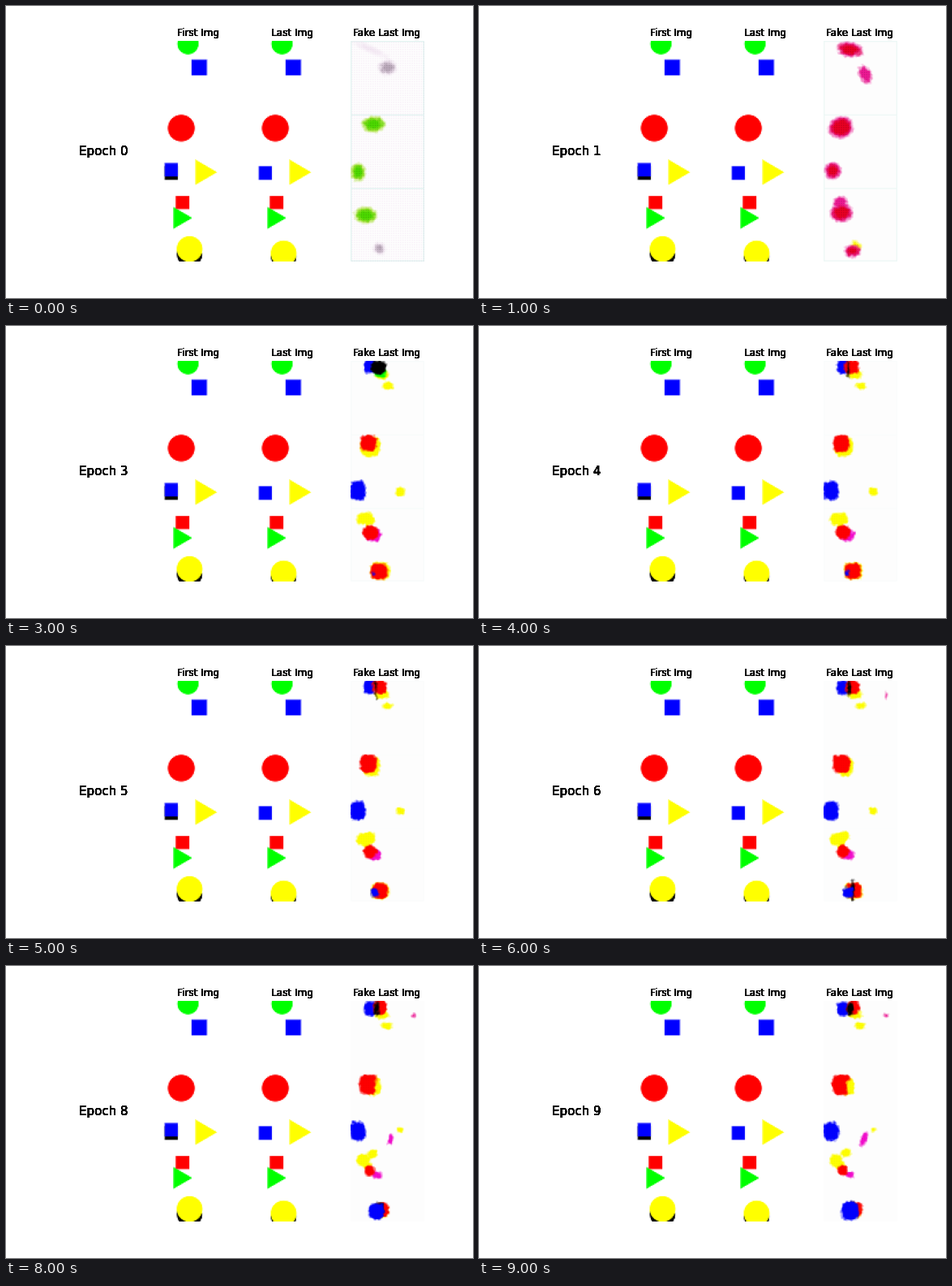
Recreate the animation shown at these times as a matplotlib script. Size 576 by 360 pixels, loop 10 s.

```python
import numpy as np
import matplotlib.pyplot as plt
from matplotlib.animation import FuncAnimation

W, H, DPI = 576, 360, 72
EPOCHS = 10
N = 64                       # cells per panel side
TOP, HEIGHT = 43.2, 271.8
CELL = HEIGHT / (3 * N)
CENTERS = (237.0, 353.4, 469.9)
STEP = CENTERS[1] - CENTERS[0]

RED, GREEN, BLUE = (1, 0, 0), (0, 1, 0), (0, 0, 1)
YELLOW, BLACK, MAGENTA = (1, 1, 0), (0, 0, 0), (0.95, 0.05, 0.8)
CRIMSON, PINK, LIME = (0.91, 0, 0.14), (0.93, 0.1, 0.58), (0.3, 0.86, 0)
OLIVE, MAUVE, HAZE = (0.68, 0.9, 0.2), (0.74, 0.67, 0.74), (0.95, 0.9, 0.95)

rows, cols = np.mgrid[0:3 * N, 0:N]
Y = TOP + (rows + 0.5) * CELL
X_LEFT = CENTERS[0] + (cols + 1 - N / 2) * CELL
X_FAKE = CENTERS[2] + (cols + 0.5 - N / 2) * CELL
MESH = (rows % 2) * (cols % 2)


def paint(img, dist, color, soft=1.0, mesh=0.0):
    """Blend a colour in where the signed distance (px) is negative."""
    a = np.clip(0.5 - dist / soft, 0, 1)[..., None]
    tone = np.array(color) * (1 - mesh * MESH[..., None])
    img[:] = img * (1 - a) + tone * a


def disc(img, x, y, r, color):
    paint(img, np.hypot(X_LEFT - x, Y - y) - r, color)


def square(img, x, y, half, color):
    paint(img, np.maximum(abs(X_LEFT - x), abs(Y - y)) - half, color)


def triangle(img, x, y, w, half, color):
    slope = (abs(Y - y) * w + (X_LEFT - x - w) * half) / np.hypot(w, half)
    paint(img, np.maximum(x - X_LEFT, slope), color)


def scene(last):
    img = np.ones((3 * N, N, 3))
    disc(img, 224.7, 46.8, 13, GREEN)
    square(img, 238.5, 76, 9.6, BLUE)
    disc(img, 216.5, 150.7, 16.5, RED)
    triangle(img, 234, 205, 26.5, 15.5, YELLOW)
    square(img, 204.3, 206, 8.2, BLUE if last else BLACK)
    if not last:
        square(img, 204.3, 202, 8.2, BLUE)
    square(img, 218, 242.3, 8.2, RED)
    triangle(img, 207, 261.3, 23, 13.3, GREEN)
    disc(img, 226.7, 309 if last else 306, 15.6, BLACK)
    disc(img, 226.7, 305 if last else 299.6, 15.8, YELLOW)
    return img


class Fake:
    """Column of three generated panels at one epoch."""

    def __init__(self, epoch):
        self.img = np.full((3 * N, N, 3), 0.995)
        noise = np.random.default_rng(epoch).normal(0, 1.4, (3 * N, N))
        for axis in (0, 1, 0, 1):
            noise = (noise + np.roll(noise, 1, axis)) / 2
        self.noise = noise

    def blob(self, color, x, y, rx, ry, soft=2.5, tilt=0, power=2.5, mesh=0.03):
        if min(rx, ry) < 0.9:
            return
        t = np.radians(tilt)
        dx, dy = X_FAKE - x, Y - y
        u = abs(dx * np.cos(t) + dy * np.sin(t)) / rx
        v = abs(dy * np.cos(t) - dx * np.sin(t)) / ry
        dist = ((u ** power + v ** power) ** (1 / power) - 1) * min(rx, ry)
        panel = int((y - TOP) / (N * CELL))
        dist = np.where(rows // N == panel, dist + self.noise, 99)
        paint(self.img, dist, color, soft, mesh)

    def glow(self, halo, core, x, y, rx, ry, tilt=0):
        self.blob(halo, x, y, rx, ry, 4.5, tilt, 2, 0.1)
        self.blob(core, x, y, rx - 3, ry - 3, 4.5, tilt, 2, 0.15)

    def rims(self, strength):
        """Tinted panel borders."""
        edge = (rows % N == 0) | (cols == 0) | (rows == 3 * N - 1) | (cols == N - 1)
        self.img -= strength * edge[..., None] * np.array([1, 0.35, 0.45])


def draw_green(f):
    f.img -= 0.055 * MESH[..., None] * np.array([0.4, 1, 0.4])
    f.blob(HAZE, 448, 53, 14, 3, 6, 25)
    f.glow(HAZE, MAUVE, 470, 76, 11, 9)
    f.glow(OLIVE, LIME, 453, 146, 13, 9.5, -8)
    f.glow(OLIVE, LIME, 434, 205, 8.5, 10)
    f.glow(OLIVE, LIME, 443, 258, 12.5, 9.5)
    f.glow(HAZE, MAUVE, 460, 299, 7, 7)


def draw_pink(f):
    f.glow(PINK, CRIMSON, 457, 54, 14.5, 8.5, 12)
    f.glow(PINK, PINK, 475.5, 84.5, 7, 10, -30)
    f.glow(PINK, CRIMSON, 446, 150, 14.5, 12.5, -20)
    f.glow(PINK, CRIMSON, 436, 203, 9.5, 9.5)
    f.glow(PINK, PINK, 445, 243, 8, 8)
    f.glow(PINK, CRIMSON, 446.5, 255, 12.5, 11)
    f.glow(YELLOW, YELLOW, 464, 296, 6, 5.5)
    f.glow(PINK, CRIMSON, 460, 302, 9, 7.5)


def draw_shapes(f, epoch):
    p = (epoch - 2) / (EPOCHS - 3)     # slow drift, 0 to 1
    fade = np.exp(-2 * (epoch - 2))    # quick early shrink
    late = max(0, 2 * p - 1)           # details of the second half
    soft = 2.5 + 2 * fade
    dark = epoch == 3

    def go(a, b):
        return a + (b - a) * p

    # upper panel
    f.blob(YELLOW, 463, 60, 8, 5 + 4 * fade, soft)
    f.blob(YELLOW, go(470.5, 469), 74, 6 + 4 * fade, 4 + 6 * fade, soft)
    f.blob(GREEN if dark else YELLOW, 461, 57, 7.5, 6)
    f.blob(BLUE, 448.5, go(49, 53), 7.5, 9, power=3)
    f.blob(BLACK if dark else RED, go(458.5, 461), 51, go(9.5, 8), 8.5)
    f.blob(BLACK, go(454, 457.5), 52.5, 4 * p, 7.5, mesh=0)
    f.blob(PINK, 502, 61, 2.5 * late ** 0.5, 2, 3)

    # middle panel
    f.blob(YELLOW, go(448, 453), 148.5, go(12.5, 9) + 4 * fade, go(13, 11) + fade, soft)
    f.blob(RED, 446.5, go(144, 146.5), go(9.5, 11.5), go(9.5, 13), soft, power=3)
    f.blob(YELLOW, 457, 149, 4.5 * p ** 4, 8)
    f.blob(BLUE, 433.5, go(203, 204), 9.5, 11.5 + 2.5 * fade, power=3)
    f.blob(YELLOW, 485.5, go(205, 202), go(6, 3) + fade, go(6, 2.5), soft)
    f.blob(MAGENTA, 474, 213.5, 4 * late, 8 * late ** 0.5, tilt=20)

    # lower panel
    f.blob(YELLOW, go(443, 440), go(237, 240), go(11, 7.5), 7.5, soft)
    f.blob(YELLOW, go(447, 452), go(240, 230.5), 6, go(8, 5), tilt=-15)
    f.blob(YELLOW, 445, 246, 6 * p ** 0.5, 5)
    f.blob(MAGENTA, go(451, 457.5), 257.5, go(11, 5), go(9, 4), tilt=10)
    f.blob(RED, go(449, 448), go(255, 252), go(10, 6), go(10, 6), power=2)
    f.blob(YELLOW, 461, 302, go(12, 10) + 2 * fade, go(11, 9) + 2 * fade, soft, power=3)
    f.blob(RED, go(459, 464), go(303, 300), go(11, 8), go(10, 9), soft, power=3)
    f.blob(BLACK, 460, 300, 6 * late ** 0.5, 9, mesh=0)
    f.blob(BLUE, go(452, 457), go(306, 302), 10.5 * p, 11.5 * p, power=3)


def render(epoch):
    f = Fake(epoch)
    f.rims(0.1 * np.exp(-0.5 * epoch))
    if epoch == 0:
        draw_green(f)
    elif epoch == 1:
        draw_pink(f)
    else:
        draw_shapes(f, epoch)
    return np.clip(f.img, 0, 1)


def heavy_text(x, y, s, size, va):
    """Text drawn many times over, which thickens its edges."""
    return [fig.text(x / W, 1 - y / H, s, fontsize=size, ha="center", va=va,
                     family="DejaVu Sans") for _ in range(12)]


fig, axes = plt.subplots(1, 4, figsize=(W / DPI, H / DPI), dpi=DPI, facecolor="white")
fig.subplots_adjust(left=0.125, right=0.9, bottom=0.125, top=0.88, wspace=0.2)
for ax in axes:
    ax.axis("off")

for cx, title in zip(CENTERS, ("First Img", "Last Img", "Fake Last Img")):
    heavy_text(cx, TOP - 6, title, 12, "baseline")
labels = heavy_text(CENTERS[0] - STEP, TOP + HEIGHT / 2, "Epoch 0", 15, "center")

frames = [render(e) for e in range(EPOCHS)]
axes[1].imshow(scene(last=False))
axes[2].imshow(scene(last=True))
view = axes[3].imshow(frames[0])


def update(epoch):
    view.set_data(frames[epoch])
    for label in labels:
        label.set_text(f"Epoch {epoch}")
    return [view, *labels]


anim = FuncAnimation(fig, update, frames=EPOCHS, init_func=lambda: update(0),
                     interval=1000, repeat=True, repeat_delay=0, blit=False)
plt.show()
```
